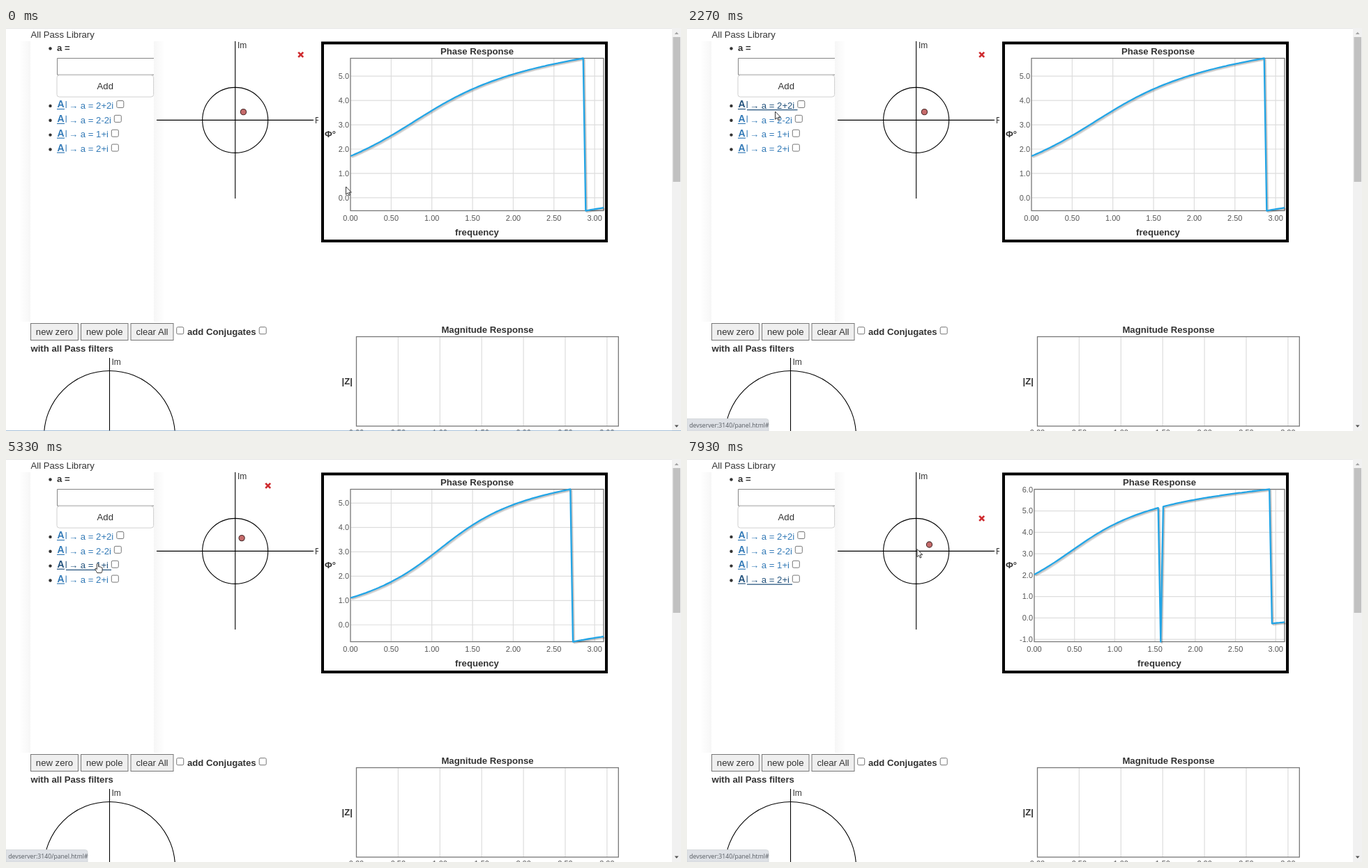
An HTML page for the animation above (8 s loop, 968 by 579 pixels).

```html
<!DOCTYPE html>
<html lang="en">
<head>
<meta charset="utf-8">
<title>All Pass Library</title>
<style>
html, body { margin: 0; width: 100%; height: 100%; overflow: hidden; background: #fff; }
svg { display: block; width: 968px; height: 579px; font: 13.15px "Liberation Sans", Arial, sans-serif; }
text { fill: #333; white-space: pre; }
.b { font-weight: bold; }
.mid { text-anchor: middle; }
.tick { font-size: 11px; fill: #555; }
.row text { fill: #337ab7; }
.row .ink { stroke: #337ab7; }
.row .under { visibility: hidden; stroke: #23527c; }
.row.hover text { fill: #23527c; }
.row.hover .ink { stroke: #23527c; }
.row.hover .under { visibility: visible; }
</style>
</head>
<body>
<svg id="stage" viewBox="0 0 968 579"></svg>
<script>
const LOOP = 8000;
const UNIT = 47, CX = 328.7, CY = 132.4;
const TOP = 43.5, BOTTOM = 262.5, RIGHT = 857;

// Filter coefficient, left edge of its plot and step of the phase axis
const FILTERS = [
  { from: 0, re: 2, im: 2, left: 494, step: 1 },
  { from: 3400, re: 2, im: -2, left: 504, step: 0.5 },
  { from: 5330, re: 1, im: 2, left: 494, step: 1 },
  { from: 7530, re: 2, im: 1, left: 498, step: 1 }
];
const CLEARED = [[1800, 1870], [3400, 3470], [7530, 7600]];
const ROWS = [
  { label: '2+2i', end: 158.5, hover: [800, 3000] },
  { label: '2-2i', end: 155, hover: [2400, 4930] },
  { label: '1+i', end: 151, hover: [4200, 7130] },
  { label: '2+i', end: 151, hover: [6140, LOOP] }
];
// time, x, y of the pointer
const PATH = [
  [30, 487.5, 228], [480, 12, 98], [870, 110, 114], [1200, 118.5, 112.5],
  [2070, 118.5, 112.5], [2270, 126.5, 120], [2470, 128.5, 131.5],
  [3870, 128.5, 131.5], [4330, 131.5, 150],
  [5670, 131.5, 150], [6270, 131.5, 171], [6470, 131.5, 171], [6800, 132.5, 174],
  [7735, 132.5, 174], [7930, 330, 129.5]
];

const line = (x1, y1, x2, y2, stroke = '#000', width = 1.1, extra = '') =>
  `<line x1="${x1}" y1="${y1}" x2="${x2}" y2="${y2}" stroke="${stroke}" stroke-width="${width}" ${extra}/>`;
const box = (x, y, w, h, fill, stroke = 'none', extra = '') =>
  `<rect x="${x}" y="${y}" width="${w}" height="${h}" fill="${fill}" stroke="${stroke}" ${extra}/>`;
const label = (x, y, text, cls = '', extra = '') =>
  `<text x="${x}" y="${y}" class="${cls}" ${extra}>${text}</text>`;
const ring = (x, y, r) => `<circle cx="${x}" cy="${y}" r="${r}" fill="none" stroke="#000" stroke-width="1.1"/>`;
const dot = y => `<circle cx="63.5" cy="${y}" r="2.2" fill="#333"/>`;
const checkbox = (x, y) => box(x, y, 10, 10, '#fff', '#767676', 'rx="1.8"');
const button = (x, w, text) =>
  box(x, 424.5, w, 24, '#efefef', '#767676') + label(x + w / 2, 441, text, 'mid');
const within = (t, [a, b]) => t >= a && t < b;

function row({ label: value, end }, i) {
  const y = 20.85 * i;
  return `<g class="row">${label(73.5, 114.3 + y, 'A', 'b', 'font-size="14"')}
    ${line(73, 116.5 + y, 84, 116.5 + y, '', 1.2, 'class="ink"')}
    ${line(86.2, 105 + y, 86.2, 115 + y, '', 1.1, 'class="ink"')}
    ${label(90, 115.7 + y, '→ a = ' + value)}
    ${line(86, 117.6 + y, end, 117.6 + y, '', 1.2, 'class="under"')}</g>
    ${dot(111.9 + y)}${checkbox(end + 0.3, 104.5 + y)}`;
}

function scene() {
  const shade = (id, a, b) => `<linearGradient id="${id}">
    <stop offset="0" stop-opacity="${a}"/><stop offset="1" stop-opacity="${b}"/></linearGradient>`;
  let magnitude = box(502.5, 443.5, 376, 128.5, '#fff');
  for (let i = 0; i < 7; i++) {
    const x = 502.5 + i * 59.9;
    if (i) magnitude += line(x, 444, x, 572, '#ddd', 1.2);
    magnitude += label(x, 585, (i / 2).toFixed(2), 'tick mid');
  }
  return `<defs>${shade('fadeIn', 0, 0.035)}${shade('fadeOut', 0.035, 0)}
      <clipPath id="realAxis"><path d="M216 120H448V145H216Z"/></clipPath></defs>
    ${box(0, 0, 968, 579, '#fff')}${line(0, 0.5, 955, 0.5, '#e4e4e4', 1)}
    ${box(19, 19, 16, 403, 'url(#fadeIn)')}${box(212, 19, 16, 403, 'url(#fadeOut)')}
    ${label(35.5, 14.3, 'All Pass Library')}
    ${dot(29.5)}${label(73, 33.3, 'a =', 'b')}
    <path d="M212 43.5H73.5V67.2H212" fill="#fff" stroke="#858585"/>
    ${box(73, 67.8, 138.6, 31.2, '#fff', '#d0d0d0', 'rx="3.5"')}
    ${label(142.3, 88, 'Add', 'mid')}
    ${ROWS.map(row).join('')}
    ${line(CX, 19, CX, 245)}${line(216, CY, 441, CY)}${ring(CX, CY, UNIT)}
    ${label(332, 29, 'Im', '', 'font-size="12"')}
    <g clip-path="url(#realAxis)">${label(443, 137, 'Re', '', 'font-size="12"')}</g>
    <g id="roots"></g>
    ${box(454, 21.5, 407, 284.5, '#fff', '#000', 'stroke-width="4"')}
    ${label(457, 157, 'Φ°', 'b')}<g id="chart"></g>
    ${button(35.5, 68, 'new zero')}${button(107.5, 67.5, 'new pole')}${button(179, 61, 'clear All')}
    ${checkbox(244.7, 429.7)}${label(260, 441, 'add Conjugates', 'b')}${checkbox(363.2, 429.7)}
    ${label(35.5, 464.7, 'with all Pass filters', 'b')}
    ${line(148.5, 474, 148.5, 579)}${ring(148.5, 586.5, 94)}
    ${label(151.5, 484, 'Im', '', 'font-size="12"')}
    ${label(690.5, 438, 'Magnitude Response', 'b mid')}${label(481.5, 512, '|Z|', 'b')}
    ${magnitude}${box(502.5, 443.5, 375.8, 128.5, 'none', '#777', 'stroke-width="1.3"')}
    ${box(955, 0, 13, 579, '#f1f1f1')}${box(956.5, 13, 10.5, 208, '#c1c1c1')}
    <path d="M958.8 9L961.7 5.8L964.6 9Z" fill="#a3a3a3"/>
    <path d="M958.8 570.5L961.7 573.7L964.6 570.5Z" fill="#505050"/>
    <g id="edge">${line(0, 578.6, 968, 578.6, '#86a9cb', 0.8)}</g>
    <g id="status"><path d="M0 561.5H113.5Q117 561.5 117 565V579H0Z" fill="#dee1e6" stroke="#cfd2d6" stroke-width=".8"/>
      ${label(3.3, 573.8, 'devserver:3140/panel.html#', '', 'style="font:8.7px \'Open Sans\',sans-serif;fill:#555a60"')}</g>
    <g id="pointer" stroke="#222" stroke-width=".9" fill="#fff" stroke-linejoin="round">
      <path id="arrow" d="M0 0V11.2L2.6 8.8L4.3 12.6L6 11.8L4.3 8.1H7.8Z"/>
      <path id="hand" d="M-1.2 8.6V1Q0 -.8 1.2 1V4.8Q2.4 4 3.3 5.2Q4.5 4.5 5.1 5.7Q6.6 5.4 6.6 7V9.6Q6.6 11.6 5.4 13.6H-.8Q-1.6 11.8 -3.6 8.5Q-4 6.8 -2.5 7.2Z"/>
    </g>`;
}

// Phase in radians of the all-pass filter with pole a and zero 1/conj(a)
function phase({ re, im }, w) {
  const x = Math.cos(w), y = Math.sin(w), n = re * re + im * im;
  return Math.atan2(y - im / n, x - re / n) - Math.atan2(y - im, x - re);
}

function chart(filter) {
  const { left, step } = filter;
  const freqs = Array.from({ length: 100 }, (_, i) => Math.PI * i / 100);
  const values = freqs.map(w => phase(filter, w));
  const low = Math.min(...values), high = Math.max(...values);
  const px = w => left + (RIGHT - left) * w / freqs[99];
  const py = v => BOTTOM - (BOTTOM - TOP) * (v - low) / (high - low);
  const center = (left + RIGHT) / 2;
  let out = '';
  for (let w = 0; w <= 3; w += 0.5) {
    if (w) out += line(px(w), TOP, px(w), BOTTOM, '#ddd', 1.2);
    out += label(px(w), 276.5, w.toFixed(2), 'tick mid');
  }
  for (let v = Math.ceil(low / step) * step; v <= high; v += step) {
    out += line(left, py(v), RIGHT, py(v), '#ddd', 1.2);
    out += label(left - 2, py(v) + 3.7, (v || 0).toFixed(step < 1 ? 2 : 1), 'tick', 'text-anchor="end"');
  }
  const points = freqs.map((w, i) => px(w).toFixed(1) + ',' + py(values[i]).toFixed(1)).join(' ');
  const curve = (shift, stroke) =>
    `<polyline points="${points}" transform="translate(${shift} ${shift})" fill="none" stroke="${stroke}" stroke-width="2.3" stroke-linejoin="round"/>`;
  return out + box(left, TOP, RIGHT - left, BOTTOM - TOP, 'none', '#777', 'stroke-width="1.3"') +
    [2.2, 1.5, 0.8].map(s => curve(s, 'rgba(0,0,0,.1)')).join('') + curve(0, '#23a5e6') +
    label(center, 38, 'Phase Response', 'b mid') + label(center, 297.5, 'frequency', 'b mid');
}

function roots({ re, im }) {
  const n = re * re + im * im;
  const x = CX + re * UNIT, y = CY - im * UNIT;
  return `<circle cx="${CX + re / n * UNIT}" cy="${CY - im / n * UNIT}" r="4.1" fill="#c66b6b" stroke="#4b2c2c" stroke-width="1.1"/>
    <path d="M${x - 3.5} ${y - 3.5}l7 7m0 -7l-7 7" stroke="#cf2b2f" stroke-width="2.7"/>`;
}

function pointerAt(t) {
  const next = PATH.findIndex(key => key[0] > t);
  if (next === 0) return PATH[0].slice(1);
  if (next < 0) return PATH[PATH.length - 1].slice(1);
  const [t0, x0, y0] = PATH[next - 1], [t1, x1, y1] = PATH[next];
  const u = (t - t0) / (t1 - t0), k = u * u * (3 - 2 * u);
  return [x0 + (x1 - x0) * k, y0 + (y1 - y0) * k];
}

const get = id => document.getElementById(id);
const show = (el, on) => el.setAttribute('visibility', on ? 'visible' : 'hidden');
get('stage').innerHTML = scene();
const rowNodes = document.querySelectorAll('.row');
let shown = null;

function draw(t) {
  const filter = FILTERS.filter(f => t >= f.from).pop();
  if (filter !== shown) {
    shown = filter;
    get('chart').innerHTML = chart(filter);
    get('roots').innerHTML = roots(filter);
  }
  show(get('roots'), !CLEARED.some(span => within(t, span)));
  ROWS.forEach((r, i) => rowNodes[i].classList.toggle('hover', within(t, r.hover)));
  show(get('edge'), t < 1470);
  get('status').setAttribute('opacity', Math.max(0, Math.min(1, (t - 900) / 200)));

  const [x, y] = pointerAt(t);
  const onLink = x > 73 && x < 160 && ROWS.some((_, i) => Math.abs(y - 111 - 20.85 * i) < 8);
  get('pointer').setAttribute('transform', `translate(${x.toFixed(2)} ${y.toFixed(2)})`);
  show(get('hand'), onLink);
  show(get('arrow'), !onLink);
}

function tick() {
  draw(performance.now() % LOOP);
  requestAnimationFrame(tick);
}
tick();
</script>
</body>
</html>
```
